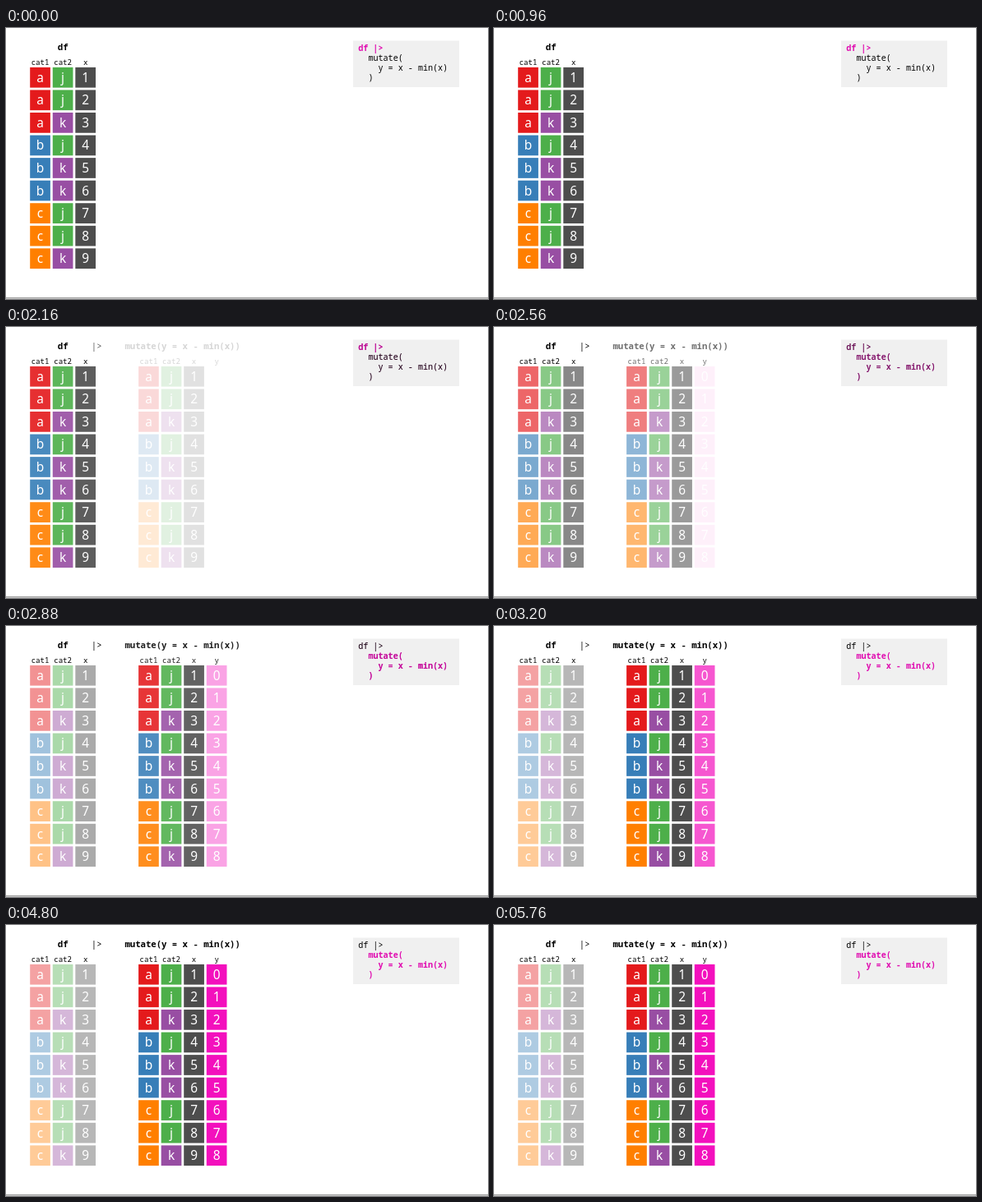
An HTML page that plays this animation: 586x330 px, repeating every 6000 ms.

```html
<!DOCTYPE html>
<html lang="en">
<head>
<meta charset="utf-8">
<title>Mutate a data frame</title>
<style>
  html, body { margin: 0; width: 100%; height: 100%; overflow: hidden; background: #fff; }
  svg { display: block; width: 100vw; height: 100vh; }
  text { white-space: pre; font-family: "Noto Sans Mono", "DejaVu Sans Mono", monospace; }
  .title { font-size: 10.65px; font-weight: 700; }
  .pipe { font-weight: 400; }
  .head { font-size: 9.1px; text-anchor: middle; }
  .cell { font: 15.4px "Noto Sans", "Open Sans", sans-serif; fill: #fff; text-anchor: middle; }
  .code { font-size: 10.08px; }
  .bold { font-weight: 700; }
</style>
</head>
<body>
<svg id="stage" viewBox="0 0 586 330"></svg>
<script>
const LOOP = 6000, STEP = 80, PITCH = 27.56, SIZE = 24.7;
const PINK = [224, 12, 176];
const FILL = {
  a: "#e41a1c", b: "#377eb8", c: "#ff7f00",
  j: "#4daf4a", k: "#984ea3", x: "#4d4d4d", y: "#f310bd"
};
const stage = document.getElementById("stage");

function add(parent, tag, attrs, content) {
  const node = document.createElementNS("http://www.w3.org/2000/svg", tag);
  for (const key in attrs) node.setAttribute(key, attrs[key]);
  if (content !== undefined) node.textContent = content;
  return parent.appendChild(node);
}

const group = () => add(stage, "g", {});
const label = (parent, cls, x, y, content) =>
  add(parent, "text", { class: cls, x, y }, content);

function column(parent, left, values, fill) {
  [...values].forEach((value, row) => {
    const top = 47.9 + row * PITCH;
    add(parent, "rect", {
      x: left, y: top, width: SIZE, height: SIZE, fill: fill || FILL[value]
    });
    label(parent, "cell", left + SIZE / 2, top + 17.8, value);
  });
}

function table(left, heads, cells) {
  ["cat1", "cat2", "x"].forEach((name, i) =>
    label(heads, "head", left + SIZE / 2 + i * PITCH, 45, name));
  column(cells, left, "aaabbbccc");
  column(cells, left + PITCH, "jjkjkkjjk");
  column(cells, left + 2 * PITCH, "123456789", FILL.x);
}

// Regular text with a bold copy above it; both shift from black to pink.
function codeLine(x, y, content) {
  const plain = label(stage, "code", x, y, content);
  const bold = label(stage, "code bold", x, y, content);
  return amount => {
    const color = `rgb(${PINK.map(v => Math.round(v * amount))})`;
    plain.setAttribute("fill", color);
    plain.setAttribute("opacity", amount < 1 ? 1 : 0);
    bold.setAttribute("fill", color);
    bold.setAttribute("opacity", amount);
  };
}

add(stage, "rect", { width: 586, height: 330, fill: "#fff" });
add(stage, "rect", { y: 328.3, width: 586, height: 1.1, fill: "#777" });
add(stage, "rect", { x: 422, y: 15.5, width: 129, height: 56.5, fill: "#f0f0f0" });

const input = group(), pipe = group(), output = group(), added = group();
label(stage, "title", 62.8, 27.2, "df");
table(29.2, stage, input);
label(pipe, "title pipe", 103.8, 27.2, "|>");
label(output, "title", 144.4, 27.2, "mutate(y = x - min(x))");
table(161.1, output, output);
const yLeft = 161.1 + 3 * PITCH;
label(output, "head", yLeft + SIZE / 2, 45, "y");
column(added, yLeft, "012345678", FILL.y);

const source = codeLine(428.2, 28.3, "df |>");
const verb = [
  codeLine(440.4, 40.4, "mutate("),
  codeLine(452.5, 52.4, "y = x - min(x)"),
  codeLine(440.4, 64.4, ")")
];

const fade = (time, start) => Math.min(1, Math.max(0, (time - start) / 1000));
const setOpacity = (node, value) => node.setAttribute("opacity", value);

function draw(time) {
  const shift = fade(time, 2000);
  setOpacity(input, 1 - 0.6 * shift);
  setOpacity(pipe, fade(time, 1500));
  setOpacity(output, shift);
  setOpacity(added, fade(time, 2500));
  source(1 - shift);
  verb.forEach(line => line(shift));
}

const began = performance.now();
function tick() {
  const time = (performance.now() - began) % LOOP;
  draw(Math.floor(time / STEP) * STEP);
  requestAnimationFrame(tick);
}
draw(0);
requestAnimationFrame(tick);
</script>
</body>
</html>
```
